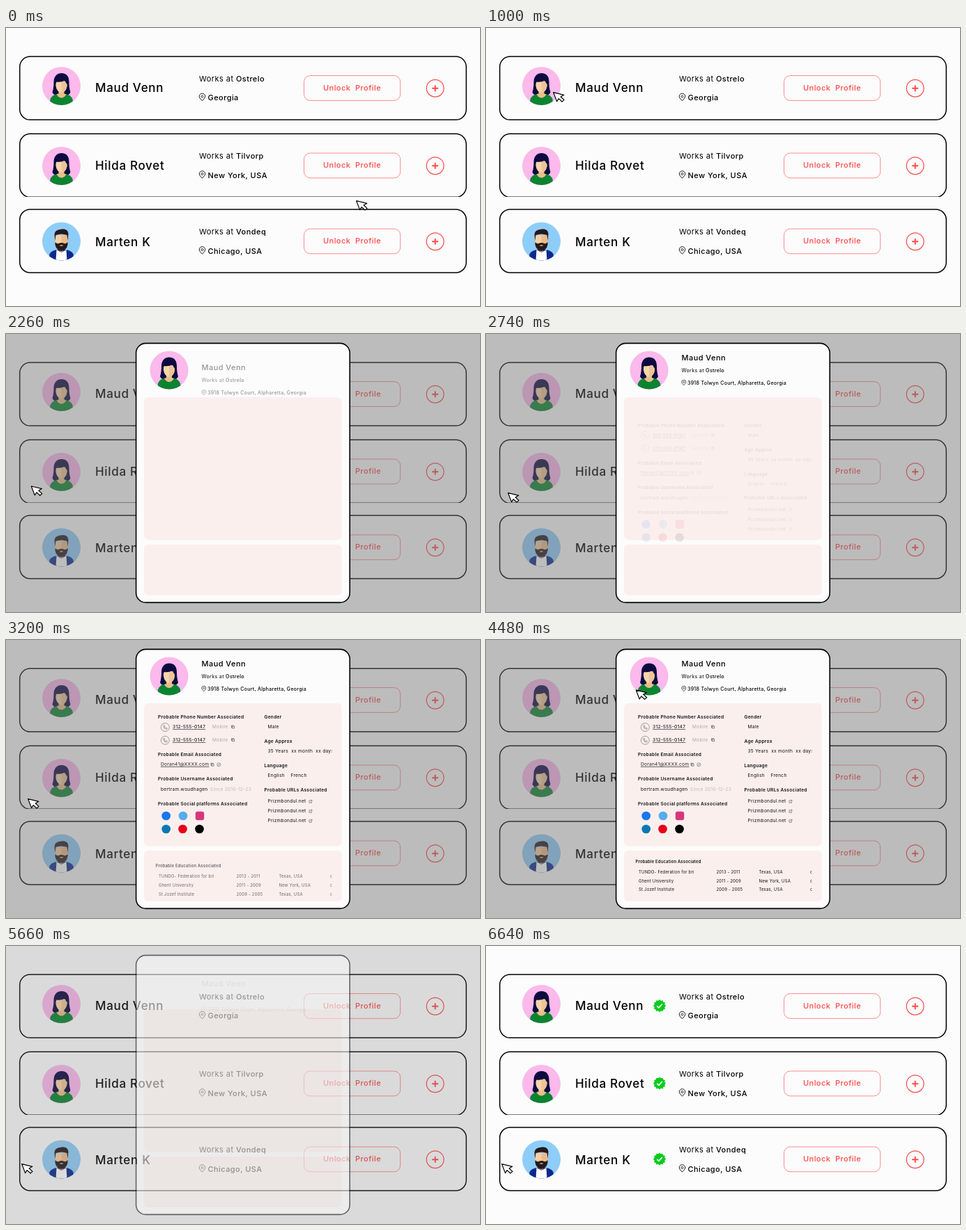
An HTML page that plays this animation: 680 px wide and 400 px high, repeating every 6.66 s.

```html
<!DOCTYPE html>
<html lang="en">
<head>
<meta charset="utf-8">
<style>
  html, body { margin: 0; width: 100%; height: 100%; overflow: hidden; background: #fcfcfc; }
  svg { display: block; }
  text { font-family: Inter, "Open Sans", sans-serif; letter-spacing: .04em; white-space: pre; }
</style>
</head>
<body>
<svg id="stage" width="680" height="400" viewBox="0 0 680 400"></svg>
<script>
const LOOP = 6660, RED = '#ff4848';
const stage = document.getElementById('stage');

const text = (x, y, size, s, weight = 500, fill = '#000', extra = '') =>
  `<text x="${x}" y="${y}" font-size="${size}" font-weight="${weight}" fill="${fill}" ${extra}>${s}</text>`;
const box = (x, y, w, h, r, fill, stroke = 'none', sw = 1) =>
  `<rect x="${x}" y="${y}" width="${w}" height="${h}" rx="${r}" fill="${fill}" stroke="${stroke}" stroke-width="${sw}"/>`;
const dot = (x, y, r, fill, stroke = 'none', sw = 1) =>
  `<circle cx="${x}" cy="${y}" r="${r}" fill="${fill}" stroke="${stroke}" stroke-width="${sw}"/>`;
const path = (d, fill, stroke = 'none', sw = 1) =>
  `<path d="${d}" fill="${fill}" stroke="${stroke}" stroke-width="${sw}" stroke-linejoin="round"/>`;
const at = (x, y, inner, scale = 1) => `<g transform="translate(${x} ${y}) scale(${scale})">${inner}</g>`;
const group = (id, inner, extra = '') => `<g id="${id}" ${extra}>${inner}</g>`;

const avatar = (bg, inner) => dot(0, 0, 27.5, bg) + `<g clip-path="url(#disc)">${inner}</g>`;

const woman = avatar('#fbb9ec',
  path('M-11 -6C-11 -14 -6 -18.5 0 -18.5C8 -18.5 11 -13 11 -6Q11 3 13 9Q11 14 6 13H-6Q-11 14 -13 9Q-11 3 -11 -6Z', '#0e0940') +
  path('M-17 28L-16 19Q-14 13 -5 11H5Q14 13 16 19L17 28Z', '#0b8430') +
  path('M-4 4H4V11L7 12Q4 17 0 17T-7 12L-4 11Z', '#e9bd8c') +
  path('M-8 -7Q0 -9 8 -6V0Q7 8 0 10Q-7 8 -8 0Z', '#f7d5aa') +
  path('M0 -8L8 -6V0Q7 8 0 10Z', '#eec494') +
  path('M-9 -2V-10Q0 -16 9 -9V-2Q6 -4 5 -8Q-1 -5 -7 -6Z', '#0e0940'));

const man = avatar('#8fcdf9',
  path('M-18 28L-17 18Q-14 13 -6 12H6Q14 13 17 18L18 28Z', '#0b2a8c') +
  path('M-7 12L0 16L7 12L8 28H-8Z', '#fff') +
  path('M-4 4H4V12L0 16L-4 12Z', '#d9a878') +
  path('M-9 -9H9V2Q8 10 0 11Q-8 10 -9 2Z', '#f7cda2') +
  path('M0 -9H9V2Q8 10 0 11Z', '#edba8a') +
  path('M-9 1Q-6 4 -4 3Q0 1 4 3Q6 4 9 1V5Q7 13 0 14Q-7 13 -9 5Z', '#241a1c') +
  path('M-3 6Q0 4 3 6Q0 8 -3 6Z', '#d08f7c') +
  path('M-9 -1L-10 -9Q-10 -16 -3 -17Q9 -20 10 -11L9 -1L8 -9Q0 -12 -8 -9Z', '#241a1c'));

const pin = path('M0 5.2Q-4.3 1.2 -4.3 -1A4.3 4.3 0 0 1 4.3 -1Q4.3 1.2 0 5.2Z', 'none', '#000', .9) +
  dot(0, -1, 1.5, 'none', '#000', .8);

const burst = Array.from({ length: 24 }, (_, i) => {
  const r = i % 2 ? 7.5 : 9.2, a = i * Math.PI / 12;
  return `${(r * Math.sin(a)).toFixed(2)} ${(-r * Math.cos(a)).toFixed(2)}`;
}).join('L');
const badge = path(`M${burst}Z`, '#08cc1c') + path('M-3.8 .2L-1.2 2.8L3.8 -2.6', 'none', '#fff', 1.7);

const worksAt = (x, y, size, name) =>
  text(x, y, size, `Works at <tspan font-weight="500">${name}</tspan>`, 400);

// card top, avatar centre, line of the employer
const people = [
  { top: 41.1, face: 83.5, mid: 72.5, name: 'Maud Venn', firm: 'Ostrelo', place: 'Georgia', look: woman },
  { top: 152.3, face: 198.5, mid: 184, name: 'Hilda Rovet', firm: 'Tilvorp', place: 'New York, USA', look: woman },
  { top: 261, face: 307, mid: 293, name: 'Marten K', firm: 'Vondeq', place: 'Chicago, USA', look: man },
];

const row = ({ top, face, mid, name, firm, place, look }, i) =>
  `<g ${i === 1 ? 'clip-path="url(#thin)"' : ''}>${box(19.7, top, 640.6, 91, 15, '#fcfcfc', '#000', 1.5)}</g>` +
  at(79.5, face, look) +
  text(128, mid + (i === 2 ? 21 : 19.5), 17, name) +
  worksAt(277, mid + 4, 11, firm) +
  at(281.5, mid + 27, pin) +
  text(289.5, mid + 31.6, 11, place) +
  box(427.5, mid - 4, 138.2, 35.8, 9, 'none', '#ff8c8c') +
  text(455, mid + 17, 11, 'Unlock  Profile', 500, RED) +
  dot(615.7, mid + 14.2, 12.4, 'none', RED, 1.2) +
  path(`M611.2 ${mid + 14.2}h9m-4.5 -4.5v9`, 'none', RED, 1.9);

const copyIcon = (x, y) => at(x, y, path('M-1 -1H2V2H-1ZM-1 1H-2V-2H1V-1', 'none', '#555', .7));
const linkIcon = (x, y) => at(x, y, path('M0 -1.5H-2V2H1.5V0M.3 -2H2V-.3M2 -2L-.3 .3', 'none', '#555', .6));
const phoneLine = y =>
  dot(228.3, y, 6, 'none', '#777', .7) +
  at(228.3, y, path('M-2.6 -2.4L-1.3 -3L-.4 -1.1L-1.1 -.4Q-.4 1 .6 1.3L1.2 .5L3 1.5L2.4 2.8Q-2.4 3 -2.6 -2.4Z', 'none', '#666', .6)) +
  text(239, y + 1.8, 6.6, '312-555-0147', 500, '#222', 'text-decoration="underline"') +
  text(296, y + 1.8, 6.6, 'Mobile', 400, '#aaa') + copyIcon(325.5, y - .5);

const head = (x, y, s, size = 6.6) => text(x, y, size, s, 600, '#111');
const value = (x, y, s, size = 6.6) => text(x, y, size, s, 400, '#111');

const socials = [['#1877f2', 229.7, 253], ['#55acee', 254, 253], ['#d9367c', 278, 253],
  ['#0a77b5', 229.7, 272], ['#e60019', 253.5, 272], ['#000', 277.5, 272]];

const details =
  head(218, 113.3, 'Probable Phone Number Associated') + phoneLine(125.5) + phoneLine(144.3) +
  head(218, 167.3, 'Probable Email Associated') +
  text(222, 181.3, 6.6, 'Doran41@XXXX.com', 400, '#222', 'text-decoration="underline"') +
  copyIcon(296, 179.3) + dot(305.3, 179.3, 2.5, 'none', '#555', .6) +
  path('M304.2 179.3l.9 .9l1.5 -1.7', 'none', '#555', .6) +
  head(218, 202.3, 'Probable Username Associated') +
  value(222, 217.3, 'bertram.woudhagen') + text(293, 217.3, 6.6, 'Since 2010-12-23', 400, '#bbb') +
  head(218, 238.3, 'Probable Social platforms Associated') +
  socials.map(([c, x, y], i) => i === 2 ? box(x - 6.2, y - 6.2, 12.4, 12.4, 3, c) : dot(x, y, 6.3, c)).join('') +
  head(370.5, 113.3, 'Gender') + value(375.5, 127.3, 'Male') +
  head(370.5, 148.3, 'Age Approx') + value(375.5, 162, '35 Years  xx month  xx days') +
  head(370.5, 183.3, 'Language') + value(375.5, 197.3, 'English') + value(408.5, 197.3, 'French') +
  head(370.5, 217.6, 'Probable URLs Associated') +
  [232, 246, 260].map(y => value(375.5, y + 1.8, 'Prizmbondul.net') + linkIcon(437, y + .3)).join('');

const schools = [
  ['TUNDO- Federation for bri', '2013 - 2011', 'Texas, USA'],
  ['Ghent University', '2011 - 2009', 'New York, USA'],
  ['St.Jozef Institute', '2009 - 2005', 'Texas, USA'],
].map((cells, i) => [...cells, 'c'].map((s, c) =>
  value([219, 330.5, 391.5, 465][c], 336 + i * 12.7, s, 5.9)).join('')).join('');

const header = text(280.5, 37.8, 11, 'Maud Venn') +
  worksAt(280.5, 55, 7.2, 'Ostrelo') + at(283.8, 70, pin, .72) +
  text(289, 73, 7, '3918 Tolwyn Court, Alpharetta, Georgia');

stage.innerHTML = `<defs>
  <clipPath id="disc"><circle r="27.5"/></clipPath>
  <clipPath id="thin"><rect width="680" height="242.9"/></clipPath>
  <clipPath id="panel"><rect x="198" y="91" width="269.5" height="285"/></clipPath></defs>` +
  people.map(row).join('') +
  group('badges', people.map(p => at(249, p.mid + 13.6, badge)).join('')) +
  group('shade', box(0, 0, 680, 400, 0, 'rgba(112,112,112,.46)')) +
  group('modal',
    box(186.6, 13.4, 306.6, 373, 14, '#fcfcfc', '#000', 1.6) +
    box(198, 91, 283.5, 205.5, 6, '#fbefee') + box(198, 303, 283.5, 73, 6, '#fbefee') +
    group('header', header) +
    `<g clip-path="url(#panel)">${group('details', details)}${group('schools', head(214.5, 321.2, 'Probable Education Associated', 5.8) + schools)}</g>`) +
  group('flyer', woman) +
  group('cursor', path('M.7 .7L15.8 4.3L11.2 7L16 11.4L13 14L8.3 9.6L5.6 13.6Z', '#fff', '#000', 1.2));

const part = Object.fromEntries(['badges', 'shade', 'modal', 'header', 'details', 'schools', 'flyer', 'cursor']
  .map(id => [id, document.getElementById(id)]));

const clamp = v => Math.min(1, Math.max(0, v));
const ease = p => p < .5 ? 2 * p * p : 1 - 2 * (1 - p) ** 2;
const mix = (a, b, p) => a + (b - a) * p;
const span = (t, start, end) => clamp((t - start) / (end - start));
const presence = (t, in0, in1, out0, out1) => span(t, in0, in1) - span(t, out0, out1);

function place(el, x, y, opacity = 1) {
  el.setAttribute('transform', `translate(${x.toFixed(2)} ${y.toFixed(2)})`);
  el.setAttribute('opacity', opacity.toFixed(3));
}
const rise = (el, p) => place(el, 0, 21 * (1 - ease(p)), p);

// start, end, x, y
const moves = [[0, 1000, 96, 92], [1450, 2450, 31, 228], [3940, 4500, 215, 71], [4540, 5340, 22, 313]];

function draw(t) {
  let x = 502, y = 248;
  for (const [start, end, tx, ty] of moves) {
    const p = ease(span(t, start, end));
    x = mix(x, tx, p);
    y = mix(y, ty, p);
  }
  place(part.cursor, x, y);

  const open = presence(t, 1360, 2100, 5400, 5970);
  place(part.shade, 0, 0, open);
  place(part.modal, 0, 0, open);
  rise(part.header, presence(t, 2020, 2620, 5290, 5700));
  rise(part.details, presence(t, 2700, 3190, 4960, 5460));
  rise(part.schools, presence(t, 2880, 3400, 4640, 5140));

  const fly = presence(t, 1360, 2160, 4600, 5440);
  place(part.flyer, mix(79.5, 234, ease(fly)), mix(83.5, 52, ease(fly)), clamp(fly * 1.3));
  place(part.badges, 0, 0, span(t, 5980, 6620));
}

function tick() {
  draw(performance.now() % LOOP);
  requestAnimationFrame(tick);
}
tick();
</script>
</body>
</html>
```
